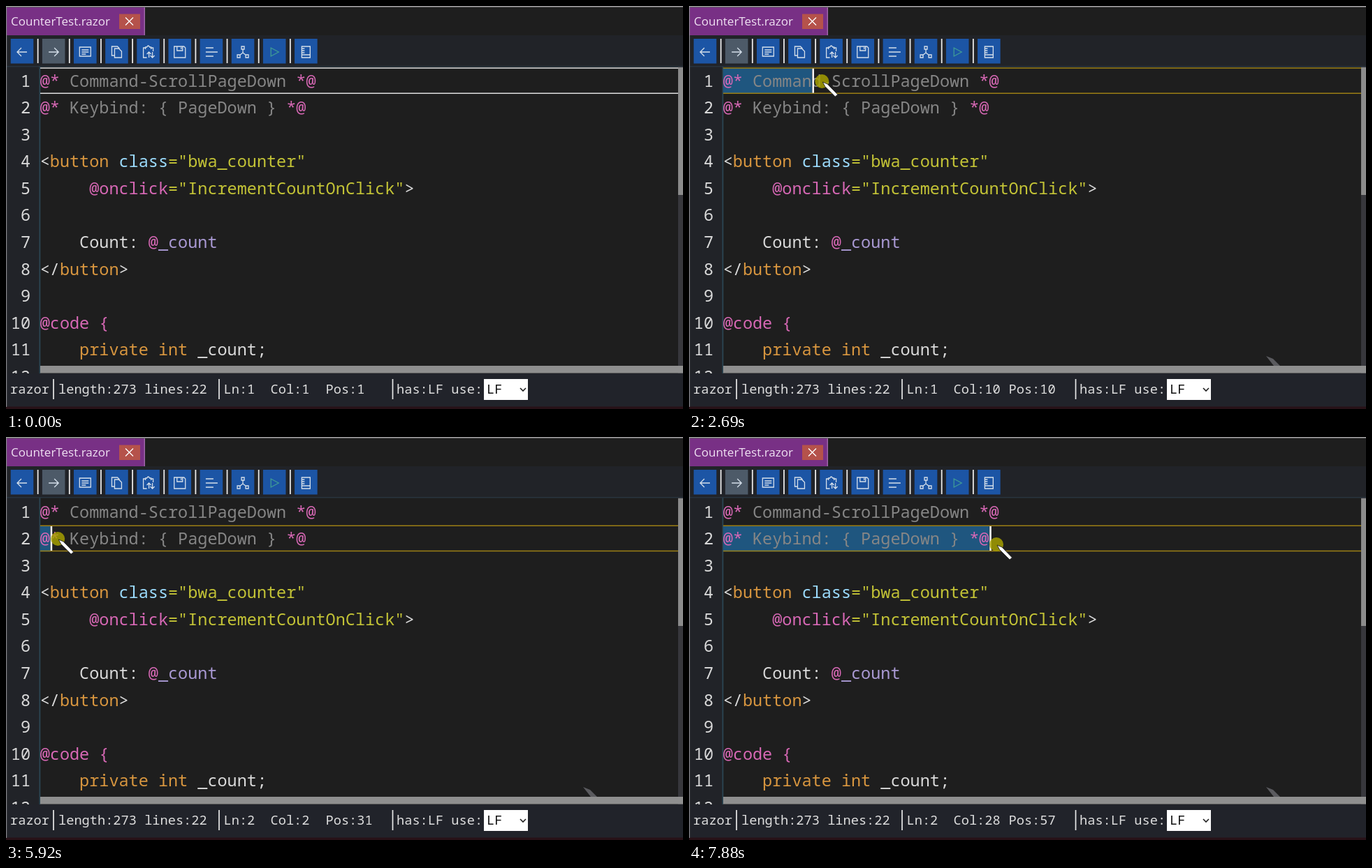
An HTML page for the animation above (8000 ms loop, 969 by 578 pixels).

```html
<!DOCTYPE html>
<html lang="en">
<head>
<meta charset="utf-8">
<title>Editor</title>
<style>
html, body { margin: 0; width: 100%; height: 100%; overflow: hidden; background: #1e1e1e; }
svg { display: block; width: 969px; height: 578px; }
text { white-space: pre; }
.code { font: 23.5px "Noto Sans Mono", monospace; fill: #dadada; }
.status { font: 18.67px "Noto Sans Mono", monospace; fill: #dedede; }
.tab { font: 17px "Open Sans", sans-serif; fill: #f0e2f3; }
.icon { fill: none; stroke: #d5dfea; stroke-width: 1.3; }
.c { fill: #868686; } .p { fill: #d768b5; } .o { fill: #d8963f; }
.b { fill: #9cdcfe; } .y { fill: #c3c336; } .v { fill: #a999d3; }
</style>
</head>
<body>
<svg viewBox="0 0 969 578">
  <rect width="969" height="578" fill="#1e1e1e"/>
  <rect y="42" width="969" height="45" fill="#212328"/>
  <rect y="87" width="48" height="440" fill="#212328"/>
  <rect x="47.5" y="87" width="1.8" height="440" fill="#2b4653"/>
  <rect y="86" width="969" height="1.5" fill="#29343e"/>
  <rect width="969" height="1.5" fill="#aaa7aa"/>
  <rect x="1" y="2" width="198" height="40" fill="#783085"/>
  <path d="M198.3 2V42" stroke="#a06aab" stroke-width="1.4"/>
  <text class="tab" x="7" y="28">CounterTest.razor</text>
  <rect x="162" y="11.5" width="30" height="21.5" fill="#b5524b"/>
  <path class="icon" d="M171 16.500l11 11m0-11l-11 11" style="stroke:#fff"/>
  <g id="tools"></g>

  <g id="row">
    <rect id="sel" x="49" y="89" height="37" fill="#1f567f"/>
    <path id="lines" d="M49 89H969M49 125.300H969" stroke-width="1.5"/>
  </g>
  <g id="code" class="code"></g>
  <rect id="caret" width="2.6" height="35" fill="#f4f4f4"/>
  <path id="smudge" d="M826 502l10 4 10 10h-9z" fill="#5b5b5f"/>

  <rect x="962" y="87" width="7" height="440" fill="#37373c"/>
  <rect x="962" y="88" width="7" height="183" fill="#8b8b8b"/>
  <rect x="49" y="516" width="920" height="10.500" fill="#8f8f8f"/>
  <rect y="527" width="969" height="51" fill="#21232a"/>
  <rect y="574.500" width="969" height="3.500" fill="#281218"/>
  <rect y="1" width="1.200" height="574" fill="#85858a"/>
  <path d="M68 535V564M305 535V564M553.500 535V564" stroke="#e8e8e8" stroke-width="1.7"/>
  <g class="status">
    <text x="6" y="556">razor</text>
    <text x="75" y="556">length:273 lines:22</text>
    <text id="ln" x="311.500" y="556"></text>
    <text id="col" x="378.500" y="556"></text>
    <text id="pos" x="457.500" y="556"></text>
    <text x="559" y="556">has:LF use:</text>
    <rect x="684" y="535" width="63" height="30" fill="#fff"/>
    <text x="688" y="556" style="fill:#111">LF</text>
  </g>
  <path d="M736 548l4 4 4-4" fill="none" stroke="#222" stroke-width="1.6"/>

  <g id="pointer">
    <circle id="press" r="10" fill="#aaa400" fill-opacity=".82"/>
    <path d="M1 1L8 4 22.500 19 19 22 4.500 7.500z" fill="#fff" stroke="#151515" stroke-width=".8"/>
  </g>
</svg>
<script>
const $ = id => document.getElementById(id);
const LOOP = 8000, PITCH = 14.1, LINE = 38.55;

// Each run is "class|text"; an empty class keeps the default colour.
const code = [
  ['p|@*', 'c| Command-ScrollPageDown ', 'p|*@'],
  ['p|@*', 'c| Keybind: { PageDown } ', 'p|*@'],
  [],
  ['|<', 'o|button', 'b| class', 'y|="bwa_counter"'],
  ['p|     @onclick', 'y|="IncrementCountOnClick"', '|>'],
  [],
  ['|    Count: ', 'p|@', 'v|_count'],
  ['|</', 'o|button', '|>'],
  [],
  ['p|@code {'],
  ['o|    private int', '| _count;'],
  []
];
const esc = s => s.replace(/</g, '&lt;').replace(/>/g, '&gt;');
const run = r => {
  const [cls, text] = r.split('|');
  return `<tspan class="${cls}">${esc(text)}</tspan>`;
};
$('code').innerHTML = code.map((runs, i) => {
  const y = 115.7 + i * LINE;
  return `<text x="35" y="${y}" text-anchor="end">${i + 1}</text>` +
    `<text x="48.7" y="${y}">${runs.map(run).join('')}</text>`;
}).join('');

const icons = [
  'M7 0H-7M-1-6l-6 6 6 6',
  'M-7 0H7M1-6l6 6-6 6',
  'M-8-7H8V6H-8zM-5-3H5M-5 0H5M-5 3H1',
  'M-3-5H3L7-1V8H-3zM-3 5H-7V-8H1L4-5',
  'M-2 8H-7V-6H-4M4-6H7V-1M-4-4V-7H-2Q0-11 2-7H4V-4M1 8V0M-2 3l3-3 3 3M6 0V8M3 5l3 3 3-3',
  'M-8-8H6L8-6V8H-8zM-4-8V-2H4V-8M2-7V-4',
  'M-8-6H3M-8 0H9M-8 6H3',
  'M0-4V1L-5 5M0 1L5 5M-2-8H2V-4H-2zM-8 4H-4V8H-8zM4 4H8V8H4z',
  'M-5-6L6 0-5 6z',
  'M-6-8H6V8H-6zM-6 4H6M-6-5H-2M-6-2H-2M-6 1H-2'
];
$('tools').innerHTML = icons.map((d, i) => {
  const x = 23 + i * 45.15;
  const bar = i ? `<path d="M${x - 22.5} 47V82" stroke="#e9e9e9" stroke-width="1.8"/>` : '';
  return `${bar}<rect x="${x - 16.3}" y="47" width="32.6" height="35.5"
    fill="${i == 1 ? '#4d5a68' : '#1c55a5'}"/>
    <path class="icon" transform="translate(${x} 66)" d="${d}"
    ${i == 8 ? 'style="stroke:#3f9b96"' : ''}/>`;
}).join('');

// Pointer path: time, x, y
const path = [
  [130, 950, 550], [200, 827, 502], [400, 520, 376], [600, 310, 290], [920, 135, 218],
  [1100, 98, 176], [1400, 60, 132], [1740, 44, 114], [1880, 44, 114],
  [2100, 64, 112], [2620, 173, 108], [2690, 190, 108], [3450, 412, 110], [3810, 460, 112],
  [4130, 460, 112], [4470, 388, 125], [4740, 270, 146], [5200, 90, 149], [5510, 41, 148],
  [5640, 40, 148], [5920, 74, 146], [6410, 174, 149], [7110, 315, 153], [7250, 337, 153.5],
  [7880, 440, 154], [LOOP, 440, 154]
];
const presses = [[1880, 4000], [4130, 4270], [5640, LOOP]];

function pointerAt(t) {
  const i = Math.max(1, path.findIndex(k => k[0] >= t));
  const [a, b] = [path[i - 1], path[i]];
  const f = Math.min(1, Math.max(0, (t - a[0]) / (b[0] - a[0])));
  return [a[1] + (b[1] - a[1]) * f, a[2] + (b[2] - a[2]) * f];
}

function caretOn(t) {
  if (t < 1880) return Math.floor(t / 500) % 2 == 1;
  if (t > 4130 && t < 5640) return Math.floor((t - 4130) / 500) % 2 == 0;
  return true;
}

const show = (id, on) => $(id).setAttribute('visibility', on ? 'inherit' : 'hidden');

function draw(t) {
  const [x, y] = pointerAt(t);
  const line = t < 5640 ? 0 : 1;
  const hit = Math.floor((x - 52) / PITCH);
  const chars = t < 1880 ? 0 : t >= 3810 && t < 5640 ? 28 :
    Math.max(0, Math.min(line ? 27 : 28, hit));
  const selecting = t < 4130 || t >= 5640;

  $('row').setAttribute('transform', `translate(0 ${line * 38.3})`);
  $('lines').setAttribute('stroke', t < 1880 ? '#dededf' : '#9c7f14');
  $('sel').setAttribute('width', selecting ? chars * PITCH : 0);
  $('caret').setAttribute('x', 49.5 + chars * PITCH);
  $('caret').setAttribute('y', 89.7 + line * 38.3);
  show('caret', caretOn(t));
  show('smudge', t >= 260);
  show('pointer', t >= 130);
  show('press', presses.some(([a, b]) => t >= a && t < b));
  $('pointer').setAttribute('transform', `translate(${x} ${y})`);

  $('ln').textContent = 'Ln:' + (line + 1);
  $('col').textContent = 'Col:' + (chars + 1);
  $('pos').textContent = 'Pos:' + (chars + 1 + line * 29);
}

const start = performance.now();
function tick() {
  draw((performance.now() - start) % LOOP);
  requestAnimationFrame(tick);
}
tick();
</script>
</body>
</html>
```
